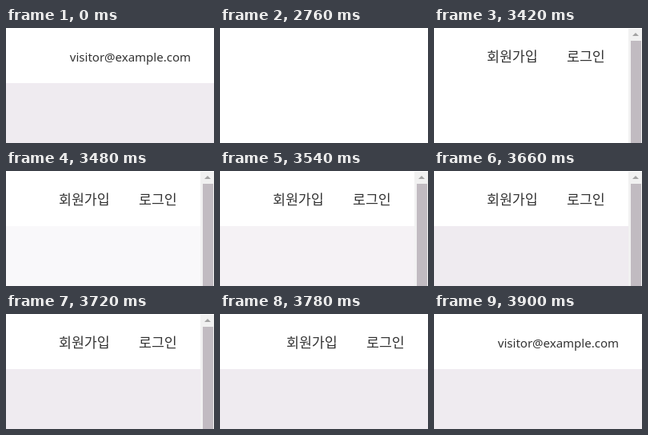
An HTML page with a canvas that plays this animation: 260 by 144 pixels, repeating every 4.92 s.

```html
<!DOCTYPE html>
<html lang="ko">
<head>
<meta charset="utf-8">
<title>Login header</title>
<style>
  html, body { margin: 0; width: 100%; height: 100%; overflow: hidden; background: #fff; }
  canvas { display: block; width: 260px; height: 144px; }
</style>
</head>
<body>
<canvas id="stage" width="260" height="144"></canvas>
<script>
const ctx = document.getElementById('stage').getContext('2d');
const W = 260, H = 144, LOOP = 4920;
const BLANK = 2760, RELOAD = 3420, SCROLLBAR_GONE = 3780, LOGGED_IN = 3900;
const STEP = 60, BAR_WIDTH = 17, PANEL_TOP = 69;

function rect(x, y, w, h, color) {
  ctx.fillStyle = color;
  ctx.fillRect(x, y, w, h);
}

function label(text, x, y, font, align = 'left') {
  ctx.font = font;
  ctx.textAlign = align;
  ctx.fillStyle = '#333';
  ctx.fillText(text, x, y);
}

function drawPanel(opacity) {
  ctx.globalAlpha = opacity;
  rect(0, PANEL_TOP, W, H - PANEL_TOP, '#efebf0');
  ctx.globalAlpha = 1;
}

function drawMenu(shift) {
  const font = '17.3px "Noto Sans CJK KR", "Noto Sans CJK", sans-serif';
  label('회원가입', 66 + shift, 42, font);
  label('로그인', 166 + shift, 42, font);
}

function drawScrollbar() {
  const left = W - BAR_WIDTH;
  rect(left, 1, BAR_WIDTH, H, '#f1f1f1');
  rect(left + 3, 16, BAR_WIDTH - 4, H, '#c1bbc1');
  ctx.fillStyle = '#a3a3a3';
  ctx.beginPath();
  ctx.moveTo(248, 10);
  ctx.lineTo(252, 6);
  ctx.lineTo(256, 10);
  ctx.fill();
}

function draw(time) {
  rect(0, 0, W, H, '#fff');
  if (time >= BLANK && time < RELOAD) return;

  if (time < BLANK || time >= LOGGED_IN) {
    drawPanel(1);
    label('visitor@example.com', 231, 42, '15px "Noto Sans", "Open Sans", sans-serif', 'right');
    return;
  }

  // The panel fades in one step at a time after the reload.
  const step = Math.floor((time - RELOAD) / STEP);
  const progress = Math.min(step / 5, 1);
  drawPanel(1 - (1 - progress) ** 2);

  const hasScrollbar = time < SCROLLBAR_GONE;
  drawMenu(hasScrollbar ? 0 : BAR_WIDTH);
  if (hasScrollbar) drawScrollbar();
}

const start = performance.now();
function tick() {
  draw((performance.now() - start) % LOOP);
  requestAnimationFrame(tick);
}
tick();
</script>
</body>
</html>
```
